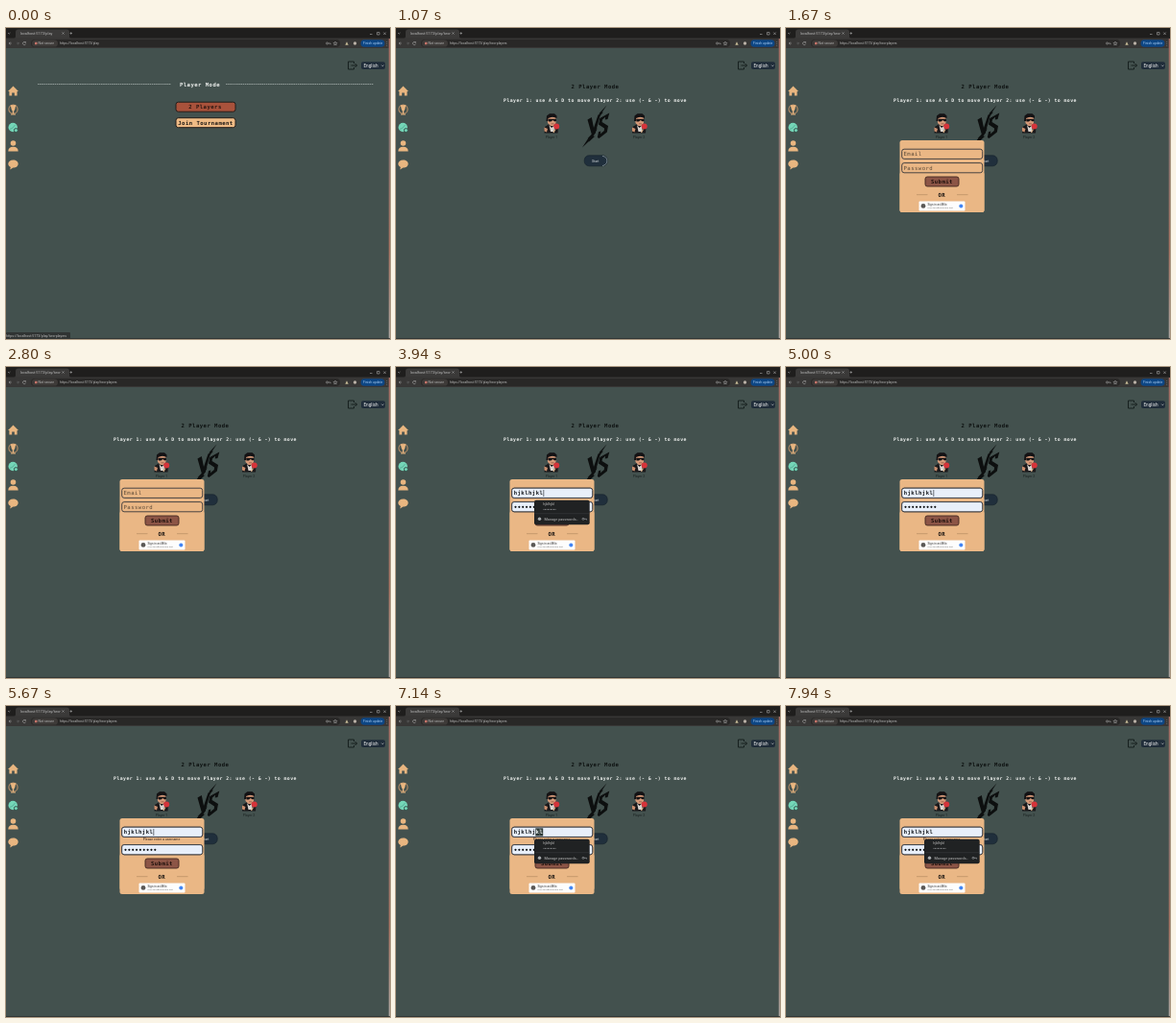
An HTML page for the animation above (8000 ms loop, 400 by 324 pixels).

```html
<!DOCTYPE html>
<html lang="en">
<head>
<meta charset="utf-8">
<title>Player mode</title>
<style>
html, body { margin: 0; width: 100%; height: 100%; overflow: hidden; background: #43514e; }
svg { display: block; width: 400px; height: 324px; }
text { font-family: Roboto, "Noto Sans", sans-serif; white-space: pre; }
.px { font: bold 5.6px "DejaVu Sans Mono", "Liberation Mono", monospace; letter-spacing: .46px; }
.rules { font-size: 4.8px; letter-spacing: .46px; }
.hint { font-weight: 400; fill: #5b4937; }
.mid { text-anchor: middle; }
.ui { font-size: 3.8px; fill: #bdbdbd; }
.url { font-size: 3.4px; }
.tiny { font-size: 3.5px; }
.field { stroke: #2b2f36; stroke-width: .85; }

/* One 8 s clock; a percentage is ms / 80. */
.cut, .fade { animation: 8s linear infinite; }
.cut { animation-timing-function: step-end; }
.choose { animation-name: choose; }
.match { animation-name: match; }
.status { animation-name: status; }
.hover { animation-name: hover; }
.modal { animation-name: modal; }
.empty { animation-name: empty; }
.filled { animation-name: filled; }
.drop { animation-name: drop; }
.push { animation-name: push; }
.error { animation-name: error; }
.caret { animation-name: caret; }
.sel1 { animation-name: sel1; }
.sel2 { animation-name: sel2; }

@keyframes choose { 0% { opacity: 1 } 5.875%, 100% { opacity: 0 } }
@keyframes match { 0% { opacity: 0 } 5.875%, 100% { opacity: 1 } }
@keyframes status { 0%, 9.25% { opacity: 1 } 11%, 100% { opacity: 0 } }
@keyframes hover { 0%, 10% { opacity: 0 } 12.5%, 17% { opacity: 1 } 20%, 100% { opacity: 0 } }
@keyframes modal { 0%, 16% { opacity: 0 } 19.25%, 100% { opacity: 1 } }
@keyframes empty { 0% { opacity: 1 } 46.75%, 100% { opacity: 0 } }
@keyframes filled { 0% { opacity: 0 } 46.75%, 100% { opacity: 1 } }
@keyframes drop {
  0%, 35.9% { opacity: 0 } 37.5%, 56.75% { opacity: 1 }
  59.25%, 83.4% { opacity: 0 } 85.5%, 100% { opacity: 1 }
}
@keyframes push { 0% { transform: none } 69.25%, 100% { transform: translateY(4px) } }
@keyframes error { 0% { opacity: 0 } 69.25%, 100% { opacity: 1 } }
@keyframes caret { 0% { opacity: 0 } 46.75% { opacity: 1 } 77.5% { opacity: 0 } 83.4% { opacity: 1 } 87.5%, 100% { opacity: 0 } }
@keyframes sel1 { 0% { opacity: 0 } 87.5% { opacity: 1 } 93.4%, 100% { opacity: 0 } }
@keyframes sel2 { 0% { opacity: 0 } 88.375% { opacity: 1 } 93.4%, 100% { opacity: 0 } }
</style>
</head>
<body>
<svg viewBox="0 0 400 324">
  <defs>
    <g id="player">
      <path d="M-7.5 10.5L-7 4L-3 1.5H4L7 4L6.5 10.5Z" fill="#1b191b"/>
      <path d="M-7.5 4.5L-4 6L-5 9.5L-7.5 8.5Z" fill="#c98d6d"/>
      <path d="M-2.5 2L0 5L3.5 2L2.5 9H-1Z" fill="#d9d4ce"/>
      <path d="M-4-6H4.5V0L2 3H-1L-4 0Z" fill="#d69a79"/>
      <path d="M-5.5-2L-5-7.5L-2-9.8H3L5.5-7.5V-5L1-6.5L-3.5-5V-2Z" fill="#141214"/>
      <path d="M-3.5-4.2H5V-2.2L3.5-1.5L1.2-3L-.5-1.5H-3Z" fill="#141214"/>
      <path d="M-.5 .8H2.5" stroke="#8d4a3c" stroke-width=".7"/>
      <circle cx="5.2" cy="3.6" r="3" fill="#d5343a"/>
      <path d="M3.8 6.5L2 10" stroke="#d9b089" stroke-width="1.3"/>
    </g>
    <linearGradient id="edge" x2="0" y2="1">
      <stop stop-color="#a4695f"/><stop offset=".35" stop-color="#867370"/>
      <stop offset=".7" stop-color="#a4705f"/><stop offset="1" stop-color="#aaa39e"/>
    </linearGradient>
  </defs>

  <rect width="400" height="324" fill="#43514e"/>

  <!-- browser frame -->
  <rect width="400" height="11" fill="#1f1e1d"/>
  <path d="M8 11Q10 11 10 8V4Q10 1.5 13 1.5H63Q66 1.5 66 4V8Q66 11 68 11Z" fill="#3b3a39"/>
  <rect y="10.5" width="399" height="10.5" fill="#383736"/>
  <rect x="26" y="12" width="322" height="8" rx="4" fill="#292827"/>
  <rect x="27" y="12.4" width="27" height="7.2" rx="3.6" fill="#3e3b39"/>
  <g fill="none" stroke="#aaa" stroke-width=".6">
    <path d="M2 5L3.2 6.2L4.4 5M58.5 4.5L60.5 6.5M60.5 4.5L58.5 6.5M66.5 5.5H69M67.7 4.2V6.8M379 6.5H381.5M386.5 4.5H389V7H386.5ZM393.3 4.5L395.7 7M395.7 4.5L393.3 7"/>
    <path d="M4.5 14.7L3.2 16L4.5 17.3M3.2 16H5.7M20.3 15A1.6 1.6 0 1 0 20.6 16.6M20.5 14.2V15.3H19.4"/>
    <path d="M11 16H13.5M12.2 14.7L13.5 16L12.2 17.3" opacity=".4"/>
    <circle cx="334.5" cy="16" r="1"/><path d="M335.5 16H338V17.2"/>
    <path d="M343 14.2L343.6 15.4L344.9 15.6L344 16.5L344.2 17.8L343 17.1L341.8 17.8L342 16.5L341.1 15.6L342.4 15.4Z"/>
  </g>
  <rect x="30" y="14.7" width="2.4" height="2.6" rx=".6" fill="#c9766b"/>
  <path d="M353.3 17.7L355 14.3L356.7 17.7Z" fill="#c3b894"/>
  <circle cx="363.5" cy="16" r="1.7" fill="#b9b0a6"/>
  <rect x="369.5" y="12.2" width="25" height="7.6" rx="3.8" fill="#0d4684"/>
  <text x="372" y="17.2" class="ui" style="font-size:3.4px;fill:#a9cdf5">Finish update</text>
  <path d="M396.7 14V14.6M396.7 16V16.6M396.7 18V18.6" stroke="#aaa" stroke-width=".7"/>
  <text x="33.6" y="17.2" class="ui url" fill="#c8aaa5">Not secure</text>
  <rect x="398.7" y="11" width="1.3" height="313" fill="url(#edge)"/>
  <rect y="323.2" width="400" height=".8" fill="#2c302f"/>

  <!-- side menu -->
  <g fill="#e9b680">
    <path d="M2 66L7.5 60.6L13 66H11.6V70.6H8.8V67.4H6.2V70.6H3.4V66Z"/>
    <circle cx="7.5" cy="84.7" r="4.6" fill="none" stroke="#b98f67" stroke-width="1.1"/>
    <path d="M4.7 80.3H10.3L9.2 85L8.2 86.5V89.6H6.8V86.5L5.8 85Z"/>
    <path d="M5 90H10" stroke="#e9b680"/>
    <circle cx="7.5" cy="120" r="2.8"/>
    <path d="M2.3 128.6Q2.3 123.7 7.5 123.7Q12.7 123.7 12.7 128.6Z"/>
    <path d="M7.5 137.4C10.6 137.4 12.7 139.2 12.7 141.5S10.6 145.6 7.5 145.6L4.2 147.4L4.8 145C3.2 144.2 2.3 143 2.3 141.5C2.3 139.2 4.4 137.4 7.5 137.4Z"/>
  </g>
  <circle cx="7.2" cy="103.5" r="4.7" fill="#74d6b8"/>
  <path d="M4 105.5Q7 105 9.5 101" fill="none" stroke="#4f9d8a" stroke-width=".7"/>
  <circle cx="10.4" cy="106.6" r="2" fill="#74d6b8" stroke="#36524c" stroke-width="1"/>

  <!-- language and exit -->
  <path d="M362.5 37V35H356.5V43H362.5V41M359.5 39H365.5M363.6 37L365.6 39L363.6 41" fill="none" stroke="#17201f" stroke-width="1"/>
  <rect x="370" y="35.2" width="25" height="7.8" rx="2" fill="#202d3a"/>
  <text x="372.4" y="40.7" class="ui" style="font-size:4.7px;fill:#f4f4f4">English</text>
  <path d="M391.2 38.6L392.3 39.8L393.4 38.6" fill="none" stroke="#ddd" stroke-width=".6"/>

  <!-- mode choice -->
  <g class="cut choose">
    <text x="14.8" y="6.8" class="ui">localhost:5173/play</text>
    <text x="56" y="17.2" class="ui url">https://localhost:5173/play</text>
    <path d="M33 58.5H172M229 58.5H383" stroke="#a5aeab" stroke-width=".8" stroke-dasharray="1.6 .6"/>
    <text x="202" y="60.6" class="px mid" fill="#eef0ee">Player Mode</text>
    <rect x="177" y="77.2" width="62" height="10" rx="2.5" fill="#a9523b" stroke="#231d1a"/>
    <text x="207.5" y="84.3" class="px mid" fill="#2b1712">2 Players</text>
    <rect x="177" y="93.7" width="62" height="10" rx="2.5" fill="#efbb85" stroke="#231d1a"/>
    <text x="208" y="100.8" class="px mid" fill="#1c1714">Join Tournament</text>
  </g>
  <g class="fade status">
    <rect y="317" width="67" height="7" rx="1" fill="#303433"/>
    <text x="0" y="321.6" class="ui" style="font-size:3.6px">https://localhost:5173/play/two-players</text>
  </g>

  <!-- match -->
  <g class="cut match">
    <text x="14.8" y="6.8" class="ui">localhost:5173/play/two-</text>
    <text x="56" y="17.2" class="ui url">https://localhost:5173/play/two-players</text>
    <text x="207.5" y="62.6" class="px mid" fill="#0e1211">2 Player Mode</text>
    <text x="207.5" y="77.2" class="px rules mid" fill="#f1f3f1">Player 1: use A &amp; D to move Player 2: use (- &amp; -) to move</text>
    <use href="#player" x="162" y="99"/>
    <use href="#player" x="253.5" y="99"/>
    <text x="162" y="114.8" class="tiny mid" fill="#1c2322">Player 1</text>
    <text x="253" y="114.8" class="tiny mid" fill="#1c2322">Player 2</text>
    <g fill="#0d0f0f">
      <path d="M219.5 80.5L214.5 88L216 87.5L210.5 94L212 88.5Z"/>
      <path d="M210 104L205.5 113L207.5 112.5L200.5 119L201.5 117.5L194 124.5L200.5 114.5L199.5 115L206 108.5Z"/>
      <path d="M199.5 95.5L203.8 93L206 104L210.5 90.5L213 90L207.5 110L204 111.5Z"/>
      <path d="M222.3 88.5L220.5 95L217.8 95.5L218 92.8L215 95.5L214.6 98L221 102L219.8 108.5L211.5 115L209.8 114L211 108.2L213.3 107.5L213 110.3L216.8 107L217 104.5L211 100.5L212.3 94Z"/>
    </g>
    <rect x="196.2" y="132.8" width="24" height="11" rx="5" fill="#202f3c" stroke="#18252f" stroke-width=".7"/>
    <path d="M215 133.4Q219.8 134 219.8 138.3Q219.8 142.5 215 143.6" fill="none" stroke="#8b999d" stroke-width=".8" class="fade hover"/>
    <text x="207.7" y="139.6" class="tiny mid" fill="#d5dbdd">Start</text>
  </g>

  <!-- sign-in -->
  <g class="fade modal">
    <rect x="118.5" y="117" width="88" height="75" rx="2.5" fill="#eab785"/>
    <rect x="120.7" y="126.2" width="84" height="10.2" rx="2.4" fill="#eab785" class="field"/>
    <g class="cut push">
      <rect x="118.5" y="150" width="88" height="42" rx="2.5" fill="#eab785"/>
      <rect x="120.7" y="140.6" width="84" height="10.2" rx="2.4" fill="#eab785" class="field"/>
      <text x="122.5" y="147.8" class="px hint cut empty">Password</text>
      <g class="cut filled">
        <rect x="120.7" y="140.6" width="84" height="10.2" rx="2.4" fill="#e8effa" class="field"/>
        <path d="M124.5 145.8H156" stroke="#101316" stroke-width="2.2" stroke-linecap="round" stroke-dasharray="0 3.85"/>
      </g>
      <rect x="145" y="155" width="35" height="10" rx="2.2" fill="#8c5546" stroke="#422820" stroke-width=".9"/>
      <text x="162.4" y="162" class="px mid" fill="#1e100c">Submit</text>
      <path d="M136 173.7H147.5M178 173.7H189.5" stroke="#bd9165" stroke-width=".8"/>
      <text x="162.3" y="175.8" class="px mid" fill="#171310">OR</text>
      <rect x="138.5" y="180.4" width="48" height="10.2" rx="1" fill="#fdfdfd"/>
      <circle cx="143" cy="185.4" r="2.4" fill="#5b5957"/>
      <text x="147.5" y="184.8" class="tiny" style="font-size:3.1px" fill="#333">Sign in as Milo</text>
      <text x="147.5" y="188.4" class="tiny" style="font-size:2.5px" fill="#777">milo.tern@example.test</text>
      <circle cx="182.3" cy="185.4" r="2" fill="#4285f4"/>
    </g>
    <text x="122.5" y="133.4" class="px hint cut empty">Email</text>
    <g class="cut filled">
      <rect x="120.7" y="126.2" width="84" height="10.2" rx="2.4" fill="#e8effa" class="field"/>
      <text x="122.7" y="133.4" class="px" fill="#15191d">hjklhjkl</text>
    </g>
    <path d="M153.8 128V135" stroke="#15191d" stroke-width=".6" class="cut caret"/>
    <g class="cut sel2">
      <rect x="145.3" y="127.3" width="4" height="8.2" fill="#2e3b39"/>
      <text x="145.6" y="133.4" class="px" fill="#eef2f2">k</text>
    </g>
    <g class="cut sel1">
      <rect x="149.2" y="127.3" width="4" height="8.2" fill="#2e3b39"/>
      <text x="149.4" y="133.4" class="px" fill="#eef2f2">l</text>
    </g>
    <text x="162" y="140" class="tiny mid cut error" fill="#33241a">Please enter a username</text>
  </g>

  <!-- saved logins -->
  <g class="fade drop">
    <rect x="144" y="138.7" width="57.7" height="25.6" rx="2" fill="#202223"/>
    <path d="M144 152.7H201.7" stroke="#3c3f41" stroke-width=".5"/>
    <text x="153.3" y="144.4" class="ui">hjklhjkl</text>
    <path d="M154 148.4H167" stroke="#a9acae" stroke-width=".9" stroke-linecap="round" stroke-dasharray="0 1.5"/>
    <circle cx="149.5" cy="158.3" r="1.7" fill="#a9adb0"/>
    <text x="154.5" y="159.7" class="ui">Manage passwords…</text>
    <circle cx="195" cy="158.3" r="1" fill="none" stroke="#a9adb0" stroke-width=".6"/>
    <path d="M196 158.3H198.6V159.5" fill="none" stroke="#a9adb0" stroke-width=".6"/>
  </g>
</svg>
</body>
</html>
```
